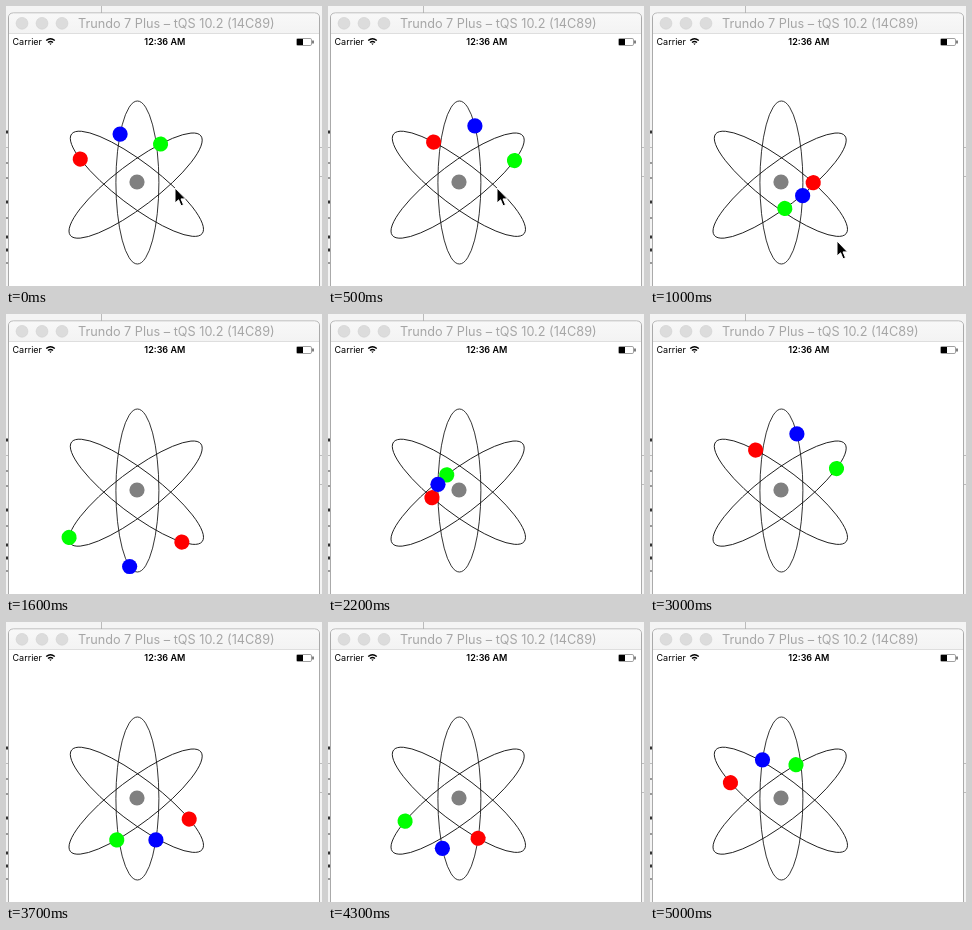
Write an HTML page that moves like this. It is 316x280 px and loops after 5100 ms.

```html
<!DOCTYPE html>
<html lang="en">
<head>
<meta charset="utf-8">
<title>Atom</title>
<style>
  html, body { margin: 0; width: 100%; height: 100%; overflow: hidden; background: #f4f4f4; }
  svg { display: block; width: 316px; height: 280px; }
  text { font-family: Inter, "Liberation Sans", sans-serif; }
</style>
</head>
<body>
<svg viewBox="0 0 316 280">
  <defs>
    <linearGradient id="bar" x2="0" y2="1">
      <stop stop-color="#f8f8f8"/><stop offset="1" stop-color="#f3f3f3"/>
    </linearGradient>
  </defs>

  <!-- desktop behind the window -->
  <path d="M95.5 0V7" stroke="#bbb"/>
  <path d="M0 141.5H2M314 141.5H316M314 170.5H316" stroke="#bbb"/>
  <path d="M0 126H2M0 196H2M0 231H2M0 244H2" stroke="#333" stroke-width="3"/>
  <path d="M0 157H2M0 172H2M0 212H2M0 257H2" stroke="#999" stroke-width="2"/>

  <!-- window -->
  <path d="M2.5 280V12q0-5 5-5H308.5q5 0 5 5V280" fill="#fff" stroke="#aaa"/>
  <path d="M3 27.5V12q0-4.500 4.500-4.500H308.5q4.500 0 4.500 4.500V27.5Z" fill="url(#bar)"/>
  <path d="M3 27.5H313" stroke="#dedede"/>
  <g fill="#dcdcdc" stroke="#d0d0d0" stroke-width=".6">
    <circle cx="16" cy="17.3" r="5.9"/><circle cx="36" cy="17.3" r="5.9"/><circle cx="56" cy="17.3" r="5.9"/>
  </g>
  <text x="170.3" y="22" font-size="12.7" fill="#a6a6a6" text-anchor="middle">Trundo 7 Plus – tQS 10.2 (14C89)</text>

  <!-- status bar -->
  <text x="6.5" y="39.3" font-size="9">Carrier</text>
  <g fill="none" stroke="#000" stroke-width="1.3">
    <path d="M40.2 34.6q4.300-3.800 8.600 0M42 36.6q2.500-2.200 5 0"/>
    <path d="M43.3 37.6h2.400l-1.200 1.400z" fill="#000" stroke="none"/>
  </g>
  <text x="158.8" y="39.3" font-size="9" font-weight="600" text-anchor="middle">12:36 AM</text>
  <rect x="290.5" y="32.5" width="15" height="7" rx="1.3" fill="none" stroke="#777" stroke-width=".7"/>
  <path d="M291 33h6v6h-6zM306.5 34.6h1v2.800h-1z"/>

  <g id="orbits" fill="none" stroke="#111" stroke-width=".85"></g>
  <circle cx="131" cy="176" r="7.6" fill="#808080"/>
  <g id="balls"></g>
  <path id="cursor" d="M0 0V15L3.6 11.8L6 17.8L8.5 16.7L6 10.9H10.5Z" stroke="#fff"/>
</svg>
<script>
const LOOP = 5100, STEP = 100, PERIOD = 2500, LAST = 4930;
const cursor = document.getElementById("cursor");

function add(parentId, tag, attrs) {
  const node = document.createElementNS("http://www.w3.org/2000/svg", tag);
  for (const key in attrs) node.setAttribute(key, attrs[key]);
  return document.getElementById(parentId).appendChild(node);
}

// phase: share of the orbit's length, measured clockwise from its outer tip
const electrons = [
  { x: 130.9, y: 177.8, angle: 217.3, rx: 82.1, phase: -0.079, color: "#f00" },
  { x: 129.6, y: 179.6, angle: -37.3, rx: 82.1, phase: -0.122, color: "#0f0" },
  { x: 131.4, y: 176.5, angle: -90, rx: 81.5, phase: -0.112, color: "#00f" },
].map(({ x, y, angle, rx, phase, color }) => {
  const transform = `translate(${x} ${y}) rotate(${angle})`;
  const orbit = add("orbits", "ellipse", { rx, ry: 21.5, transform });
  const ball = add("balls", "circle", { r: 7.6, fill: color, transform });
  return { orbit, ball, phase, length: orbit.getTotalLength() };
});

function placeElectrons(time) {
  for (const { orbit, ball, phase, length } of electrons) {
    const turn = time / PERIOD + phase + 1;
    const point = orbit.getPointAtLength(turn % 1 * length);
    ball.setAttribute("cx", point.x);
    ball.setAttribute("cy", point.y);
  }
}

function placeCursor(time) {
  const move = Math.min(Math.max((time - 600) / 400, 0), 1);
  const drop = time > 1000 ? 20 : 0;
  cursor.setAttribute("transform", `translate(${169 + 18 * move} ${182 + 53 * move + drop})`);
  cursor.setAttribute("visibility", time < 1200 ? "visible" : "hidden");
}

function draw(now) {
  const time = Math.floor(now % LOOP / STEP) * STEP;
  placeElectrons(Math.min(time, LAST));
  placeCursor(time);
}

const start = performance.now();
function tick() {
  draw(performance.now() - start);
  requestAnimationFrame(tick);
}
tick();
</script>
</body>
</html>
```
